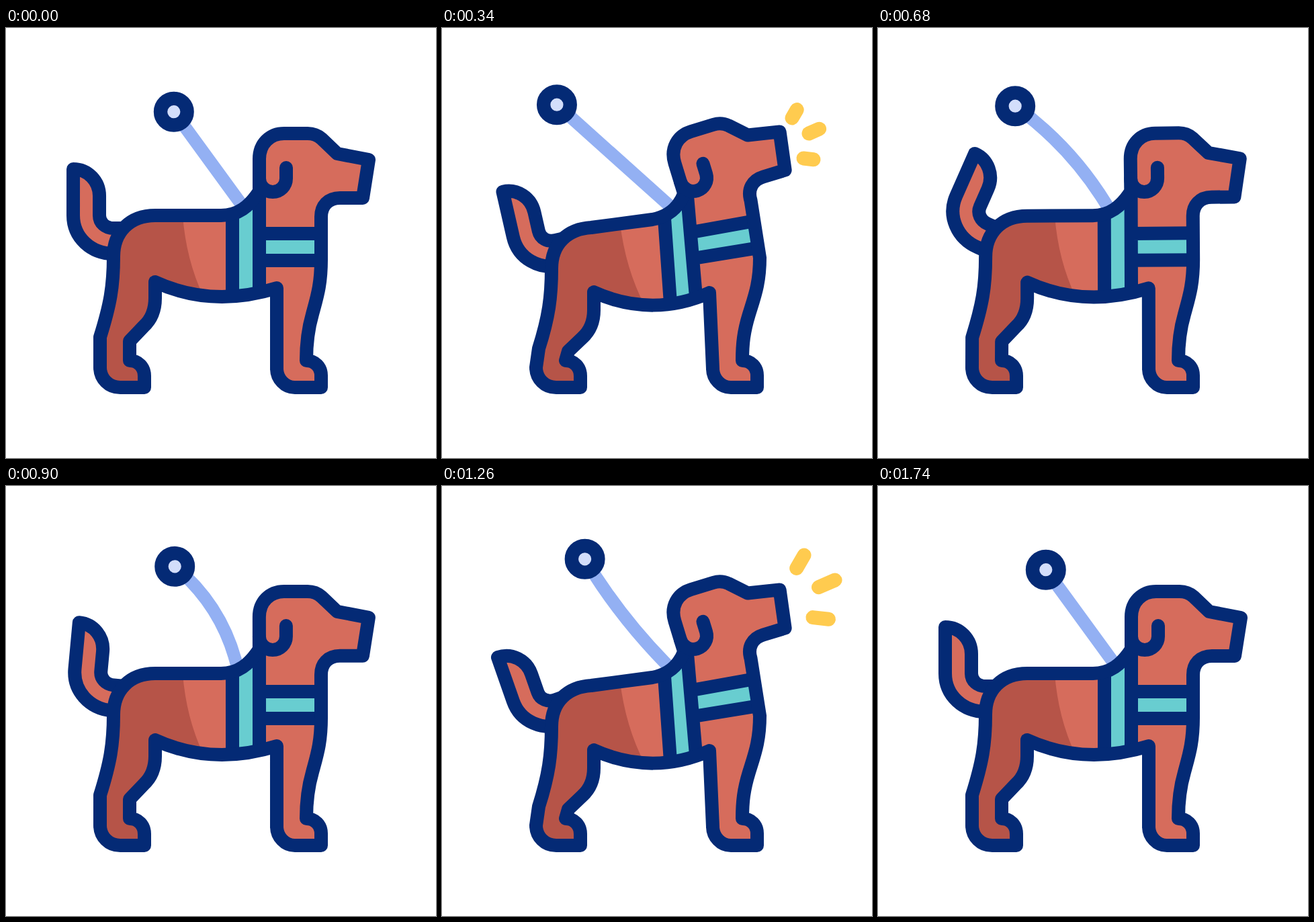
An HTML page that plays this animation: 640 px wide and 640 px high, repeating every 2400 ms.

```html
<!DOCTYPE html>
<html lang="en">
<head>
<meta charset="utf-8">
<title>Guide dog</title>
<style>
  html, body { margin: 0; width: 100%; height: 100%; overflow: hidden; background: #fff; }
  svg { display: block; width: 100vw; height: 100vh; }
  .line { fill: none; stroke: #042a75; stroke-width: 20; stroke-linejoin: round; }
  .round { stroke-linecap: round; }
  .coat { fill: #d66c5c; }
  .shade { fill: #b65448; }
  .vest { fill: #68cdd0; }
</style>
</head>
<body>
<svg viewBox="0 0 640 640">
  <clipPath id="inside"><path id="clip"/></clipPath>
  <path id="leash" fill="none" stroke="#93b0f3" stroke-width="19"/>
  <circle id="handle" r="19.8" fill="#d3defb" stroke="#042a75" stroke-width="20.4"/>
  <path id="tail" class="line coat" d="M195,336 L160,336 C127,336 100,312 100,279 L100,210 C122,210 139,228 139,250 L139,279 C139,290 148,298 160,298 L195,298"/>
  <path id="coat" class="coat"/>
  <g clip-path="url(#inside)">
    <path id="shade" class="shade"/>
    <path id="vest" class="vest"/>
    <path id="chest" class="vest"/>
  </g>
  <path id="straps" class="line"/>
  <path id="outline" class="line"/>
  <path id="ear" class="line round"/>
  <g id="barks" fill="none" stroke="#ffcb4f" stroke-width="21" stroke-linecap="round"></g>
</svg>
<script>
const LOOP = 2400, ACTIVE = 1620, BARK = 810, RISE = 387;
const el = id => document.getElementById(id);
const clamp = v => Math.min(1, Math.max(0, v));
const lerp = (a, b, k) => a + (b - a) * k;
const smooth = k => (1 - Math.cos(Math.PI * clamp(k))) / 2;
const wagEase = k => lerp(k, smooth(k), 0.85);

// Each shape has a resting and a raised version with matching points.
const POSES = {
  back: [
    'M206,535 L170,535 C153,535 140,522 140,505 L140,460 C155,412 160,385 160,340 C160,304 184,279 222,279 L320,279 C345,279 362,266 377,243',
    'M206,535 L170,535 C153,535 140,522 140,505 L144,477 C159,430 163,400 163,358 C163,320 188,299 222,297 L313,285 C335,281 352,268 360,247'],
  under: [
    'L469,345 C469,382 463,400 456,426 C449,450 447,470 447,495 C460,495 469,505 469,517 L469,535 L430,535 C415,535 403,522 403,507 L403,387 C345,405 283,406 222,378 L222,402 C222,420 216,434 205,444 L184,466 L184,495 C197,495 206,505 206,518 L206,535 Z',
    'L473,342 C473,380 465,400 457,426 C449,452 447,470 447,495 C460,495 469,505 469,517 L469,535 L430,535 C415,535 403,522 403,507 L398,394 C345,418 285,420 226,393 L226,420 C226,438 220,451 209,461 L188,481 L184,495 C197,495 206,505 206,518 L206,535 Z'],
  shade: [
    'M263,279 Q268,345 294,400 L294,560 L110,560 L110,279 Z',
    'M265,290 Q273,358 302,414 L302,560 L110,560 L110,290 Z'],
  vest: [
    'M337,270 L377,245 L377,400 L337,400 Z',
    'M331,280 L365,252 L378,395 L340,408 Z'],
  chest: [
    'M377,306 L469,306 L469,346 L377,346 Z',
    'M377,303 L466,287 L472,327 L380,342 Z'],
  straps: [
    'M337,279 L337,398 M377,245 L377,394 M377,306 L469,306 M377,346 L469,346',
    'M331,283 L340,410 M365,250 L378,400 M377,303 L466,287 M380,342 L472,327']
};
const HEAD = 'L377,240 L377,195 C377,172 393,157 414,157 L449,157 Q461,157 470,165 L493,187 L540,196 L531,253 L497,253 C480,253 469,264 469,281 ';
const EAR = 'M417,208 L417,224 C417,235 408,244 397,244 C386,244 377,235 377,224';

const BARKS = [[521, 134, 539, 103], [546, 157, 585, 140], [538, 194, 575.5, 198.3]];
const barkLines = BARKS.map(() =>
  el('barks').appendChild(document.createElementNS('http://www.w3.org/2000/svg', 'path')));

// Tracks hold rows of time followed by values.
const HANDLE = [[0, 249.8, 124.7, 358], [430, 162, 113, 347], [960, 254, 120, 345],
                [1400, 200.5, 105.5, 341], [1740, 249.8, 124.7, 358]];
const BEND = [[0, 0], [430, 0], [760, 26], [1020, 34], [1400, -33], [1740, 0]];
const WAG = [0, 45, -18, 45, -24, 45, -18, 45, 0].map((a, i) => [i * ACTIVE / 8, a]);

function track(rows, t, ease = smooth) {
  const i = rows.findIndex(r => r[0] > t);
  if (i < 0) return rows[rows.length - 1].slice(1);
  const a = rows[i - 1], b = rows[i], k = ease((t - a[0]) / (b[0] - a[0]));
  return a.slice(1).map((v, j) => lerp(v, b[j + 1], k));
}

function pose(name, lift) {
  const [rest, raised] = POSES[name], ends = raised.match(/\d+/g);
  let i = 0;
  return rest.replace(/\d+/g, v => lerp(+v, +ends[i++], lift).toFixed(2));
}

function tilt(path, lift) {
  const a = -17 * lift * Math.PI / 180, c = Math.cos(a), s = Math.sin(a);
  return path.replace(/(\d+),(\d+)/g, (_, px, py) => {
    const x = px - 397, y = py - 224;
    return (397 - 23 * lift + x * c - y * s).toFixed(2) + ',' +
           (224 - lift + x * s + y * c).toFixed(2);
  });
}

function liftAt(t) {
  if (t >= ACTIVE) return 0;
  const q = t % BARK, x = clamp(Math.min(q, BARK - q) / RISE);
  const up = x ** 4.6;
  return up / (up + (1 - x) ** 4.6);
}

function drawLeash(t) {
  const [x, y, endX] = track(HANDLE, t), [bend] = track(BEND, t), endY = 273;
  const dx = endX - x, dy = endY - y, len = Math.hypot(dx, dy);
  const cx = (x + endX) / 2 + bend * dy / len, cy = (y + endY) / 2 - bend * dx / len;
  el('leash').setAttribute('d', `M${x},${y} Q${cx},${cy} ${endX},${endY}`);
  el('handle').setAttribute('cx', x);
  el('handle').setAttribute('cy', y);
}

function drawBarks(t) {
  const q = t < ACTIVE ? t % BARK : 0;
  const front = smooth((q - 280) / 140), rear = smooth((q - 380) / 170);
  BARKS.forEach(([x1, y1, x2, y2], i) => {
    const at = k => `${lerp(x1, x2, k)},${lerp(y1, y2, k)}`;
    barkLines[i].setAttribute('d', front > rear ? `M${at(rear)} L${at(front)}` : '');
  });
}

function draw(t) {
  const lift = liftAt(t);
  const body = pose('back', lift) + tilt(HEAD, lift) + pose('under', lift);
  for (const id of ['clip', 'coat', 'outline']) el(id).setAttribute('d', body);
  for (const id of ['shade', 'vest', 'chest', 'straps']) el(id).setAttribute('d', pose(id, lift));
  el('ear').setAttribute('d', tilt(EAR, lift));
  const angle = track(WAG, t, wagEase)[0] - 10 * lift;
  el('tail').setAttribute('transform',
    `translate(${9 * lift} ${14 * lift}) rotate(${angle} 178 302)`);
  drawLeash(t);
  drawBarks(t);
}

function tick() {
  draw(performance.now() % LOOP);
  requestAnimationFrame(tick);
}
tick();
</script>
</body>
</html>
```
